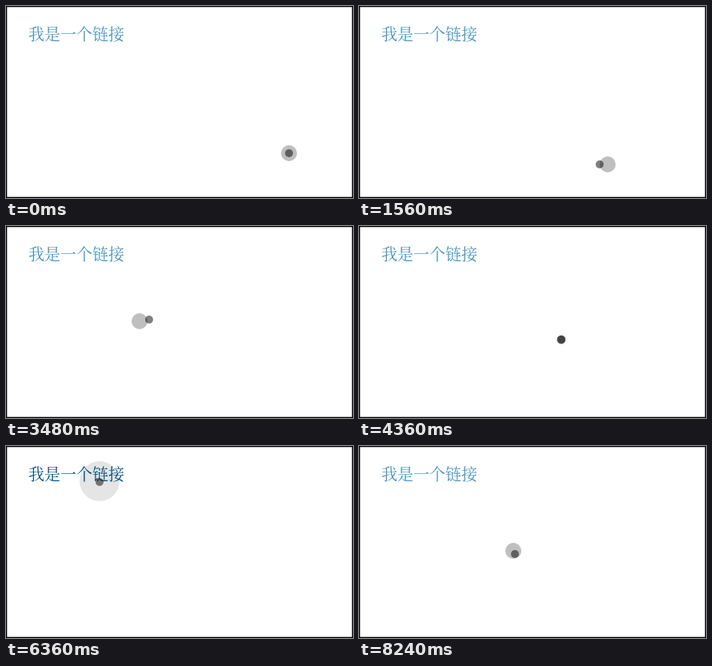
Recreate the animation shown at these times as an HTML page. Size 434 by 240 pixels, loop 8360 ms.

```html
<!DOCTYPE html>
<html lang="zh-CN">
<head>
<meta charset="utf-8">
<style>
  html, body { margin: 0; width: 100%; height: 100%; overflow: hidden; background: #fff; }
  #link {
    position: absolute; left: 28px; top: 20px; white-space: nowrap;
    font: 300 20px/30px "Noto Serif CJK SC", "Noto Serif SC", "Noto Sans CJK SC", serif;
  }
  svg { position: absolute; left: 0; top: 0; }
</style>
</head>
<body>
<span id="link">我是一个链接</span>
<svg width="434" height="240">
  <rect x=".65" y=".65" width="432.7" height="238.7" fill="none" stroke="#000" stroke-width="1.3"/>
  <circle id="ring"/>
  <circle id="dot" r="5" fill-opacity=".5"/>
</svg>
<script>
const LOOP = 8360, STEP = 40, LAG = 28, FADE = 200;
const [ring, dot, link] = ['ring', 'dot', 'link'].map(id => document.getElementById(id));

const linear = s => s;
const smooth = s => s * s * (3 - 2 * s);
const clamp = s => Math.min(Math.max(s, 0), 1);
const lerp = (a, b, k) => a + (b - a) * k;
const mix = (a, b, k) => a.map((v, i) => lerp(v, b[i], k));

// Each stroke turns around a drifting centre on an ellipse that may shrink.
// A higher bend delays the drift and the shrinking towards the end.
const strokes = [
  { time: [250, 2120], centre: [[307, 146], [296, 147]], radii: [67, 54], shrink: .35, angle: [45, 630], bend: 8, pace: linear },
  { time: [2862, 3720], centre: [[196, 128], [212, 152]], radii: [100, 53], shrink: .45, angle: [0, 335], bend: 1, pace: linear },
  { time: [4560, 5240], centre: [[253, 142], [117, 44]], pace: smooth },
  { time: [6340, 7160], centre: [[140, 78], [141, 75]], radii: [35, 44], angle: [230, -110], pace: smooth },
  { time: [7500, 8240], centre: [[129, 34], [195, 135]], pace: linear }
];

const hovers = [[5070, 6390], [6990, 7540]];
const presses = [[2460, 2680], [3900, 4350], [5620, 5830]];

// Ring radius and opacity
const idle = [10, .25], hover = [25, .1], press = [5, .5];
const linkColor = [72, 148, 190], hoverColor = [0, 84, 134];

function pointerAt(t) {
  const stroke = strokes.findLast(s => s.time[0] <= t) || strokes[0];
  const { time: [from, to], centre, radii = [0, 0], shrink = 1, angle = [0, 0], bend = 1, pace } = stroke;
  const s = pace(clamp((t - from) / (to - from)));
  const drift = s ** bend, scale = lerp(1, shrink, drift);
  const [x, y] = mix(...centre, drift);
  const turn = lerp(...angle, s) * Math.PI / 180;
  return [x + radii[0] * scale * Math.cos(turn), y + radii[1] * scale * Math.sin(turn)];
}

const fade = x => 1 - (1 - clamp(x)) ** 2;
const amount = (spans, t) => spans.reduce((sum, [on, off]) =>
  sum + fade((t - on) / FADE) - fade((t - off) / FADE), 0);

function place(circle, [x, y]) {
  circle.setAttribute('cx', Math.round(x));
  circle.setAttribute('cy', Math.round(y));
}

function draw() {
  const t = Math.floor(performance.now() % LOOP / STEP) * STEP;
  const hovered = amount(hovers, t);
  const [radius, opacity] = mix(mix(idle, hover, hovered), press, amount(presses, t));
  place(dot, pointerAt(t));
  place(ring, pointerAt(t - LAG));
  ring.setAttribute('r', radius);
  ring.setAttribute('fill-opacity', opacity);
  link.style.color = `rgb(${mix(linkColor, hoverColor, hovered).map(Math.round)})`;
  requestAnimationFrame(draw);
}
draw();
</script>
</body>
</html>
```
